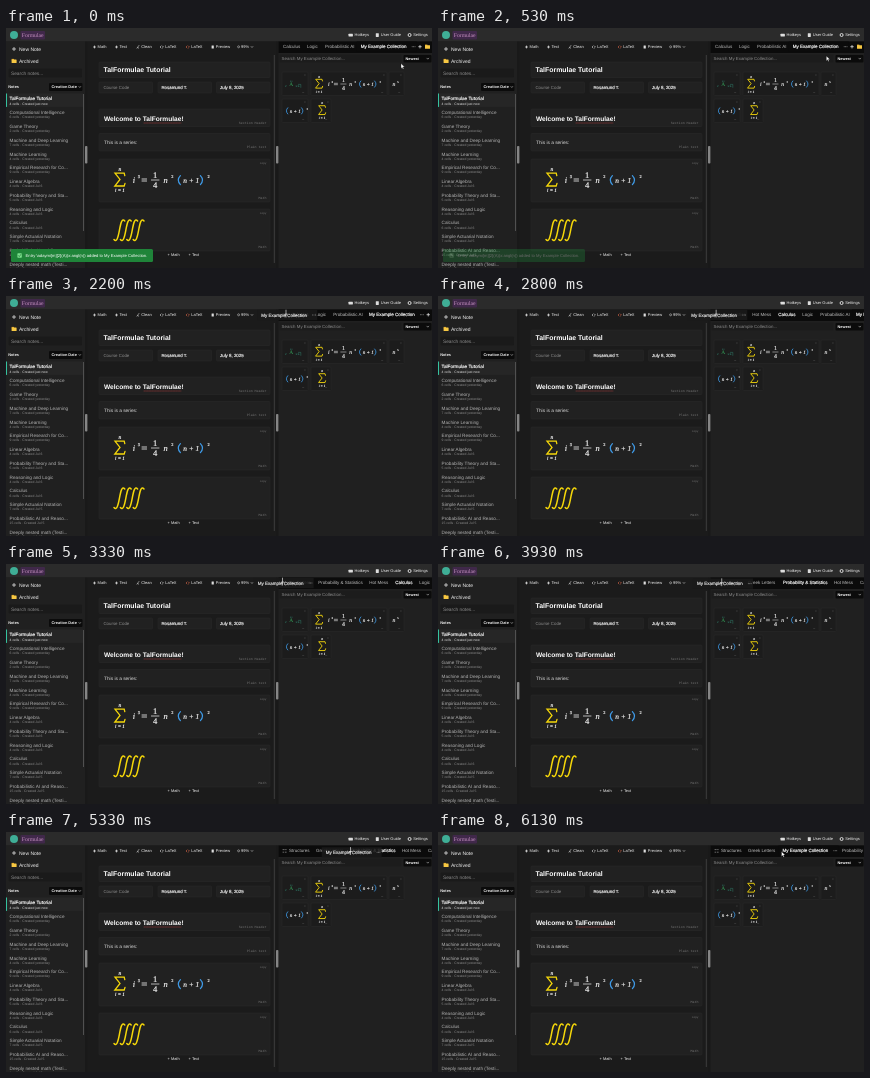
An HTML page for the animation above (6190 ms loop, 426x240 px).

```html
<!DOCTYPE html>
<html lang="en">
<head>
<meta charset="utf-8">
<title>Notes with draggable tabs</title>
<style>
  html, body { margin: 0; width: 100%; height: 100%; overflow: hidden; background: #1c1c1c; }
  svg { display: block; width: 100vw; height: 100vh; }
  text { font-family: "Liberation Sans", Arial, sans-serif; white-space: pre; text-rendering: geometricPrecision; }
  .serif { font-family: "Liberation Serif", Times, serif; }
  .it { font-family: "Liberation Serif", Times, serif; font-style: italic; }
  .mono { font-family: "Liberation Mono", Courier, monospace; }
  .bold { font-weight: bold; }
  .semi { stroke: #fff; stroke-width: .16px; }
  .math { stroke: #f2f2f2; stroke-width: .2px; }
</style>
</head>
<body>
<svg id="stage" viewBox="0 0 426 240" preserveAspectRatio="none">
  <defs>
    <clipPath id="stripClip"><rect x="272" y="13" width="154" height="12"/></clipPath>
  </defs>
</svg>
<script>
const stage = document.getElementById('stage');
const WHITE = '#f2f2f2', GREY = '#8c8c8c', YELLOW = '#f5d70a', BLUE = '#3f9be8';
const PANEL = '#202020', CELL = '#212121', LINE = '#2b2b2b', DARK = '#0b0b0b';

function el(tag, attrs, parent = stage) {
  const node = document.createElementNS('http://www.w3.org/2000/svg', tag);
  for (const key in attrs) node.setAttribute(key, attrs[key]);
  parent.appendChild(node);
  return node;
}
const group = (parent, attrs = {}) => el('g', attrs, parent);
const rect = (x, y, width, height, fill, parent, extra) =>
  el('rect', { x, y, width, height, fill, ...extra }, parent);
const box = (x, y, w, h, fill, line, parent) =>
  rect(x, y, w, h, fill, parent, { stroke: line, 'stroke-width': .5, rx: 1 });
const path = (d, stroke, width, parent, extra) =>
  el('path', { d, stroke, 'stroke-width': width, fill: 'none', 'stroke-linecap': 'round', ...extra }, parent);

// y is the vertical middle of the capitals
function text(str, x, y, size, fill = WHITE, cls = '', parent = stage, anchor = 'start') {
  const node = el('text', { x, y: y + size * .35, 'font-size': size, fill, class: cls, 'text-anchor': anchor }, parent);
  node.textContent = str;
  return node;
}
const caret = (x, y, parent) => path(`M${x - .9} ${y - .5}L${x} ${y + .5}L${x + .9} ${y - .5}`, '#ddd', .5, parent);
const plus = (x, y, r, parent) => path(`M${x - r} ${y}H${x + r}M${x} ${y - r}V${y + r}`, WHITE, .7, parent);
const folder = (x, y, parent) => {
  rect(x, y - 2.1, 2.4, 1.4, '#e0a526', parent);
  rect(x, y - 1.5, 5, 3.6, '#f7c843', parent, { rx: .4 });
};

function drawTopBar() {
  rect(0, 0, 426, 13.5, '#2b2b2b');
  el('circle', { cx: 8, cy: 7, r: 4, fill: '#3fae96' });
  rect(14.5, 3, 24.5, 8.4, '#40284a', stage, { rx: 1 });
  text('Formulae', 26.7, 7.2, 5.7, '#c48fc0', 'serif', stage, 'middle');
  rect(342.5, 5.8, 4.4, 2.6, '#ddd', stage, { rx: .4 });
  text('Hotkeys', 348.6, 7, 4);
  rect(369.8, 5.2, 3, 3.8, '#ddd', stage, { rx: .4 });
  text('User Guide', 374.8, 7, 4);
  el('circle', { cx: 403.6, cy: 7, r: 1.5, fill: 'none', stroke: '#ddd', 'stroke-width': 1 });
  text('Settings', 407.2, 7, 4);
}

function drawSidebar() {
  rect(0, 13.5, 79, 226.5, PANEL);
  plus(8, 21, 1.6);
  text('New Note', 13, 21, 5);
  folder(5.6, 33);
  text('Archived', 13, 33, 5);
  rect(2.5, 40.5, 73.5, 9, '#1a1a1a', stage, { rx: 1 });
  text('Search notes...', 5, 45, 4.8, GREY);
  text('Notes', 2.2, 59, 3.9, WHITE, 'bold');
  rect(43, 55, 33.5, 8, DARK, stage, { rx: 1 });
  text('Creation Date', 45.5, 59, 3.9, WHITE, 'bold');
  caret(73.8, 59);

  const notes = [
    ['TalFormulae Tutorial', 4, 'just now'], ['Computational Intelligence', 6, 'yesterday'],
    ['Game Theory', 2, 'yesterday'], ['Machine and Deep Learning', 7, 'yesterday'],
    ['Machine Learning', 4, 'yesterday'], ['Empirical Research for Co...', 9, 'yesterday'],
    ['Linear Algebra', 4, 'Jul 6'], ['Probability Theory and Sta...', 5, 'Jul 6'],
    ['Reasoning and Logic', 4, 'Jul 6'], ['Calculus', 6, 'Jul 6'],
    ['Simple Actuarial Notation', 7, 'Jul 5'], ['Probabilistic AI and Reaso...', 15, 'Jul 5'],
    ['Deeply nested math (Testi...', 4, 'Jul 5']
  ];
  rect(0, 65.5, 77, 13.4, '#262626');
  rect(0, 65.5, 1, 13.4, '#35c2a0');
  notes.forEach(([name, cells, day], i) => {
    const y = 70.8 + i * 13.77;
    text(name, 3.6, y, 4.67, i ? '#b4b4b4' : '#fff', i ? '' : 'semi');
    text(`${cells} cells · Created ${day}`, 3.6, y + 4.6, 3.4, i ? GREY : '#e0e0e0');
  });
  rect(77, 66, 1, 137, '#505050');
}

function drawDivider(x) {
  rect(x, 13.5, 2.4, 226.5, '#191919');
  rect(x, 118, 2.4, 17.5, '#858585', stage, { rx: .8 });
}

function sumSign(parent) {
  path('M118.8 147.6L118.2 145.2H109L114 151.4L108.8 158H118.2L119 155.4', YELLOW, 1.3, parent, { 'stroke-linejoin': 'miter' });
  text('n', 114, 140.8, 5.6, WHITE, 'it math', parent, 'middle');
  text('i = 1', 114, 162.6, 5, WHITE, 'it math', parent, 'middle');
}
function power(base, exp, x, gap, parent) {
  text(base, x, 152.2, 8.4, WHITE, 'it math', parent);
  text(exp, x + gap, 148.8, 4.4, WHITE, 'serif math', parent);
}
function bracketSquared(parent) {
  path('M174.4 147.6Q170.2 152 174.4 156.6', BLUE, 1.2, parent);
  text('n + 1', 177.2, 152.2, 7.4, WHITE, 'it math', parent);
  path('M194.4 147.6Q198.6 152 194.4 156.6', BLUE, 1.2, parent);
  text('2', 201.6, 148.6, 4.4, WHITE, 'serif math', parent);
}
function seriesFormula(parent) {
  sumSign(parent);
  power('i', '3', 126.8, 5, parent);
  path('M136 151H140.6M136 153H140.6', WHITE, .8, parent);
  text('1', 149.2, 146.8, 8.6, WHITE, 'serif math', parent, 'middle');
  path('M145.4 152H153', WHITE, .7, parent);
  text('4', 149.2, 157, 8.6, WHITE, 'serif math', parent, 'middle');
  power('n', '2', 157.6, 7.6, parent);
  bracketSquared(parent);
}

function drawMain() {
  rect(81.4, 13.5, 189, 226.5, '#1b1b1b');
  plus(88.5, 19, 1);
  text('Math', 91.6, 19, 4);
  plus(110.5, 19, 1);
  text('Text', 113.6, 19, 4);
  path('M133 17.4L131.8 19M131 20.2L131.8 19L132.4 20.2', '#ccc', .6);
  text('Clean', 135.2, 19, 4);
  [['#e0e0e0', 154], ['#e06a4a', 180]].forEach(([color, x]) => {
    path(`M${x + 1} 18L${x} 19L${x + 1} 20M${x + 2.4} 18L${x + 3.4} 19L${x + 2.4} 20`, color, .6);
    text('LaTeX', x + 5.2, 19, 4);
  });
  rect(205.6, 17.4, 2.2, 3.2, '#ddd', stage, { rx: .3 });
  text('Preview', 209.8, 19, 4);
  el('circle', { cx: 232.6, cy: 18.8, r: 1, fill: 'none', stroke: '#ddd', 'stroke-width': .5 });
  text('99%', 235, 19, 4);
  caret(246, 19);

  box(93, 34, 171, 15.5, CELL, LINE);
  text('TalFormulae Tutorial', 97.6, 41.6, 6.9, '#fff', 'bold');
  [['Course Code', 93, 97.4, GREY], ['Rosamund T.', 152, 155.4, WHITE], ['July 8, 2025', 210.5, 214, WHITE]]
    .forEach(([label, x, tx, color]) => {
      box(x, 54, 53.5, 11, CELL, LINE);
      text(label, tx, 59.3, 4.4, color, color === WHITE ? 'semi' : '');
    });

  [[81, 17.5, 'Section Header'], [105.5, 17.5, 'Plain text'], [131, 43, 'Math'], [181, 42, 'Math']]
    .forEach(([y, h, kind]) => {
      box(93, y, 171, h, CELL, LINE);
      text(kind, 260.5, y + h - 4, 3.3, '#777', 'mono', stage, 'end');
      if (kind === 'Math') text('copy', 260.5, y + 4, 2.8, '#777', 'mono', stage, 'end');
    });
  text('Welcome to TalFormulae!', 98, 91, 6.6, '#fff', 'bold');
  path('M138 95H175', '#a83a3a', .5, stage, { 'stroke-dasharray': '.8 .8' });
  text('This is a series:', 98, 114.3, 4.8, '#ddd');
  seriesFormula(stage);
  for (let i = 0; i < 4; i++) {
    const x = 108 + i * 6.4;
    path(`M${x} 211.6C${x + 2.6} 214.6 ${x + 4} 210 ${x + 5.4} 202.4S${x + 8} 189.8 ${x + 10.8} 193`, YELLOW, 1.5);
  }
  text('+ Math', 161.6, 226.3, 3.9);
  text('+ Text', 182.6, 226.3, 3.9);
  rect(267.8, 27, 1, 208, '#3d3d3d');
}

function drawCollection() {
  rect(272.4, 13.5, 154, 226.5, PANEL);
  rect(272.4, 13.5, 154, 11.5, DARK);
  rect(273.5, 26.5, 122, 8, '#1c1c1c');
  text('Search My Example Collection...', 275.6, 30.6, 4.4, GREY);
  rect(397.5, 27, 28, 7.5, DARK, stage, { rx: 1 });
  text('Newest', 399.6, 30.7, 3.8, '#fff', 'bold');
  caret(421.8, 30.7);

  [[276, 44, 26], [305, 44, 76], [383, 44, 15], [276, 71, 26], [305, 71, 20]].forEach(([x, y, w]) => {
    box(x, y, w, 23.5, '#1c1c1c', LINE);
    text('×', x + w - 4, y + 3, 3, '#666');
    text('•••', x + w - 6, y + 20.4, 2.2, '#666');
  });
  const teal = '#38a58a';
  text('2', 279, 58, 3, teal, 'serif');
  text('A', 283.2, 56.4, 5.4, '#37b060', 'serif');
  path('M284.4 53.2h.01M286 53.2h.01', teal, .6);
  text('x:n', 289.4, 58, 3.2, teal, 'serif');
  path('M292.4 56.4H294.8V59.4', teal, .35);

  const mini = (x, y, fromX) => group(stage, { transform: `translate(${x} ${y}) scale(.69) translate(${-fromX} -152)` });
  seriesFormula(mini(309, 56, 108));
  power('n', '5', 158, 7, mini(386.5, 56, 158));
  bracketSquared(mini(279.4, 82.8, 171));
  sumSign(mini(312, 82.4, 108));
}

const SCROLL_MAX = 145, DROP_SHIFT = 59;
const TABS = [['Structures', 283], ['Greek Letters', 310], ['Probability & Statistics', 345],
  ['Hot Mess', 396], ['Calculus', 422], ['Logic', 446], ['Probabilistic AI', 464]];
const DRAGGED = 'My Example Collection';

function dragTab(parent, fill) {
  rect(-4, -5.2, 60, 10.4, fill, parent);
  text(DRAGGED, 0, 0, 4.5, '#fff', 'semi', parent);
  path('M51.4 0h.01M52.8 0h.01M54.2 0h.01', '#ccc', .6, parent);
}

drawTopBar();
drawSidebar();
drawMain();
drawCollection();
drawDivider(79);
drawDivider(270);

const clip = group(stage, { 'clip-path': 'url(#stripClip)' });
const strip = group(clip);
path('M277 17.6h1.2M279.6 17.6h.6M277 20.2h.6M279.2 20.2h1', '#aaa', .6, strip);
const tabs = TABS.map(([name, x]) => text(name, x, 18.7, 4.5, '#c0c0c0', '', strip));
const activeTab = group(strip);
dragTab(activeTab, DARK);
plus(559, 18.7, 1.3, strip);
folder(564, 18.7, strip);

const toast = group(stage);
rect(5, 221, 142, 13, '#1f8439', toast, { rx: 1.5 });
rect(11.4, 225.3, 4.4, 4.4, '#7be08d', toast, { rx: .6 });
path('M12.4 227.6L13.3 228.6L14.9 226.4', '#1b6b30', .6, toast);
text('Entry \\adaymi[m][2](A)(x:angl(n)) added to My Example Collection.', 19.6, 227.5, 4.15, '#fff', '', toast);

const ghost = group(stage, { opacity: .88 });
dragTab(ghost, '#1a1a1a');
const arrow = el('path', {
  d: 'M0 0V5L1.2 3.9L2 5.7L2.8 5.3L2 3.6H3.6Z', fill: '#fff', stroke: '#000', 'stroke-width': .3
});
const grip = path('M.5 -3V4M-.4 1H1.6', '#fff', .6);

// rows: time in ms, then values
const POINTER = [[0, 395, 37], [200, 395, 37], [900, 381, 21], [1270, 379, 18.5], [1450, 379, 18.5],
  [2070, 281, 18.6], [2200, 279.5, 18.6], [3330, 276, 18.6], [3750, 277, 19], [4530, 303.5, 20],
  [5330, 344, 20], [5700, 345, 20.5], [6130, 343.5, 21]];
const SCROLL = [[0, SCROLL_MAX], [2110, SCROLL_MAX], [3690, 0]];
const TOAST = [[0, 1], [400, 1], [600, 0]];
const GRAB = 1450, DROP = 5650, LOOP = 6190, STEP = 200 / 3;

function sample(rows, t) {
  const i = rows.findIndex(row => row[0] > t);
  if (i < 0) return rows[rows.length - 1].slice(1);
  const a = rows[i - 1], b = rows[i], k = (t - a[0]) / (b[0] - a[0]);
  return a.slice(1).map((v, j) => v + (b[j + 1] - v) * k);
}
const move = (node, x, y) => node.setAttribute('transform', `translate(${x} ${y})`);
const show = (node, on) => node.setAttribute('visibility', on ? 'visible' : 'hidden');

function render(t) {
  const [x, y] = sample(POINTER, t);
  const dropped = t >= DROP, dragging = t >= GRAB && !dropped;
  const target = !dragging || t < 2000 ? '' : t < 3700 ? 'Calculus' : 'Probability & Statistics';
  move(strip, -sample(SCROLL, t)[0], 0);
  move(activeTab, dropped ? 344.5 : 499.8, 18.7);
  tabs.forEach((tab, i) => {
    const hot = TABS[i][0] === target;
    tab.setAttribute('x', TABS[i][1] + (dropped && i > 1 ? DROP_SHIFT : 0));
    tab.setAttribute('fill', hot ? '#fff' : '#c0c0c0');
    tab.setAttribute('class', hot ? 'semi' : '');
  });
  show(ghost, dragging);
  show(grip, dragging);
  show(arrow, !dragging);
  move(ghost, x - 24.3, y + .4);
  move(grip, x, y - 1.5);
  move(arrow, x, y - 1.5);
  toast.setAttribute('opacity', sample(TOAST, t)[0]);
}

const start = performance.now();
function tick() {
  const t = (performance.now() - start) % LOOP;
  render(Math.floor((t + 3.4) / STEP) * STEP);
  requestAnimationFrame(tick);
}
tick();
</script>
</body>
</html>
```
